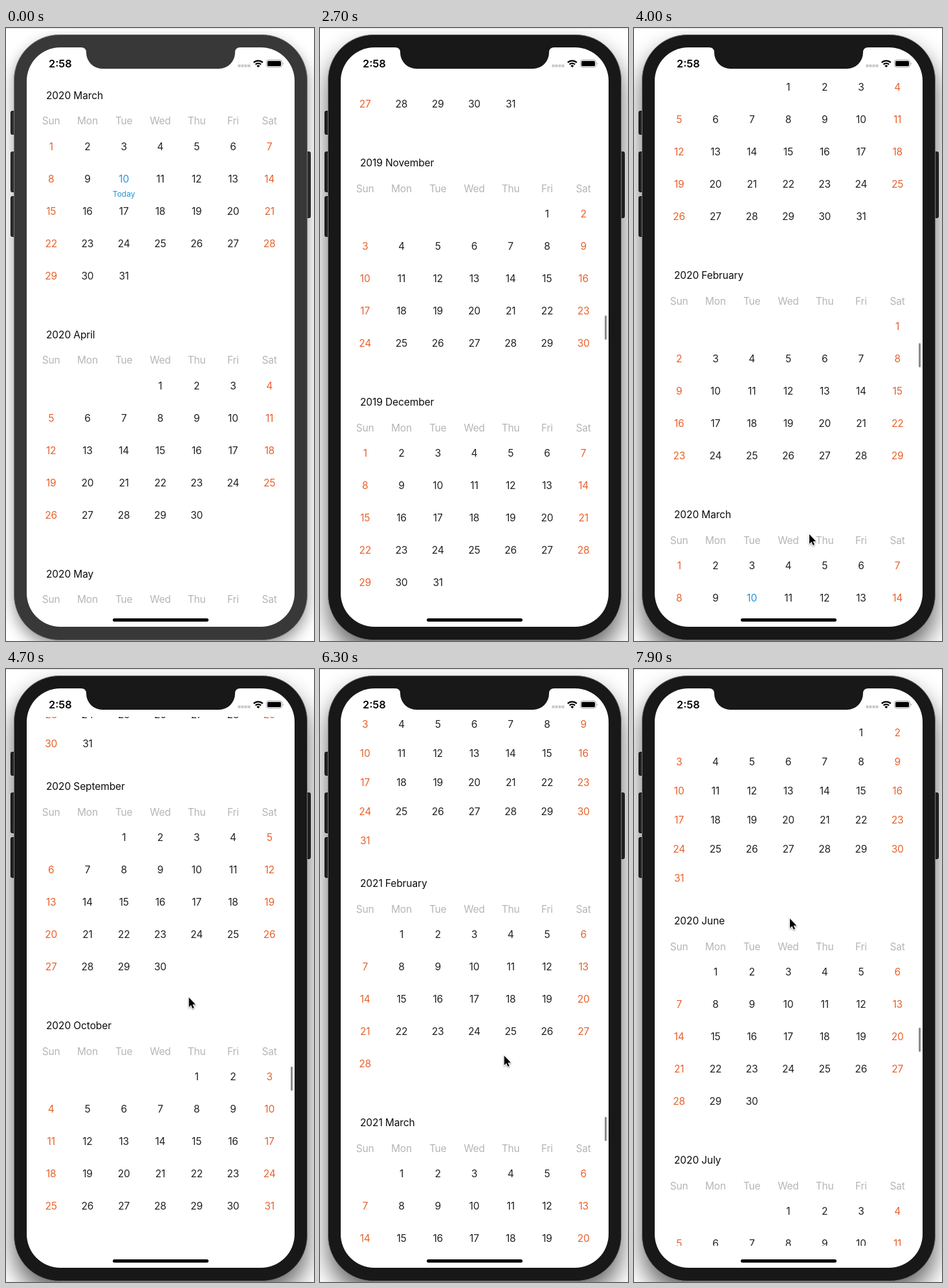
Write an HTML page that moves like this. It is 476x948 px and loops after 8000 ms.

```html
<!DOCTYPE html>
<html lang="en">
<head>
<meta charset="utf-8">
<title>Calendar scroll</title>
<style>
html, body { margin: 0; width: 100%; height: 100%; overflow: hidden; background: #fff; }
svg { display: block; width: 476px; height: 948px; --bezel: #383838; }
svg.active { --bezel: #181818; }
text { font: 15.5px Inter, Roboto, sans-serif; letter-spacing: -.2px; fill: #222; }
.mid { text-anchor: middle; }
.title { fill: #0c0c0c; letter-spacing: -.1px; }
.name { fill: #b5b5b5; }
.off { fill: #e8622c; }
.now { fill: #2095dd; }
.note { font-size: 12px; letter-spacing: 0; }
.clock { font-size: 16.3px; font-weight: 600; fill: #000; letter-spacing: 0; }
.bezel { fill: var(--bezel); }
.key { fill: #2c2c2c; stroke: #161616; }
.active .key { fill: #222; stroke: #0c0c0c; }
.far, .active .near { display: none; }
.active .far { display: inline; }
#cursor { filter: drop-shadow(0 1px 1px #0006); }
</style>
</head>
<body>
<svg id="stage" viewBox="0 0 476 948">
  <defs>
    <filter id="soft" x="-20%" y="-20%" width="140%" height="140%"><feGaussianBlur stdDeviation="11"/></filter>
    <filter id="wide" x="-20%" y="-20%" width="140%" height="140%"><feGaussianBlur stdDeviation="18"/></filter>
    <clipPath id="view"><rect x="32" y="74" width="414" height="818"/></clipPath>
  </defs>
  <rect width="476" height="948" fill="#fff"/>
  <rect class="near" x="12" y="20" width="454" height="937" rx="70" opacity=".4" filter="url(#soft)"/>
  <rect class="far" x="12" y="30" width="454" height="937" rx="70" opacity=".6" filter="url(#wide)"/>
  <rect width="476" height="1" fill="#dcdcdc"/>
  <g class="key">
    <rect x="7.5" y="128.5" width="9" height="36" rx="2"/>
    <rect x="7.5" y="191.5" width="9" height="62" rx="2"/>
    <rect x="7.5" y="260.5" width="9" height="62" rx="2"/>
    <rect x="461.5" y="191.5" width="9" height="102" rx="2"/>
  </g>
  <rect class="bezel" x="12.5" y="10.5" width="453" height="936" rx="70" stroke="#777"/>
  <rect x="32" y="30" width="414" height="896" rx="52" fill="#fff"/>
  <path class="bezel" d="M116 29V30Q124 30 124 38A25 25 0 0 0 149 63H329A25 25 0 0 0 354 38Q354 30 362 30V29Z"/>

  <g clip-path="url(#view)"><g id="list"></g></g>
  <rect id="thumb" x="440" width="3" height="37.5" rx="1.5" fill="#8c8c8c"/>

  <text class="clock" x="66" y="61">2:58</text>
  <path d="M358.5 58.5h19" stroke="#c6c6c6" stroke-width="4" stroke-dasharray="4 1"/>
  <g fill="none" stroke="#000" stroke-width="2.2">
    <path d="M382.8 53.4A10 10 0 0 1 396.8 53.4"/>
    <path d="M385.6 56.4A6 6 0 0 1 394 56.4"/>
  </g>
  <path d="M389.8 61L387.3 58.5A3.6 3.6 0 0 1 392.3 58.5Z"/>
  <rect x="402.5" y="49.5" width="24" height="11" rx="3" fill="none" stroke="#9c9c9c"/>
  <rect x="404" y="51" width="21" height="8" rx="1.6"/>
  <path d="M428 53.2Q430 55 428 56.8Z" fill="#9c9c9c"/>
  <rect x="165" y="913" width="148" height="5" rx="2.5"/>
  <path id="cursor" d="M0 0V13.6L3.1 10.7 5.2 15.6 7.3 14.7 5.2 9.9H9.4Z" stroke="#fff" stroke-width="1.6" paint-order="stroke"/>
</svg>
<script>
const LOOP = 8000, STEP = 100, PAGE = 370;
const $ = id => document.getElementById(id);
const stage = $('stage'), list = $('list'), thumb = $('thumb'), cursor = $('cursor');
const DAYS = ['Sun', 'Mon', 'Tue', 'Wed', 'Thu', 'Fri', 'Sat'];
const MONTHS = ['January', 'February', 'March', 'April', 'May', 'June', 'July',
  'August', 'September', 'October', 'November', 'December'];

const label = (x, y, kind, text) => `<text x="${x}" y="${y}" class="${kind}">${text}</text>`;
const colX = col => 69.7 + 56.24 * col;

// One calendar page; n counts months from March 2020.
function month(n) {
  const first = new Date(2020, 2 + n, 1);
  const year = first.getFullYear(), m = first.getMonth(), lead = first.getDay();
  const count = new Date(year, m + 1, 0).getDate();
  const gap = lead + count > 35 ? 45 : 50;
  const top = 104 + PAGE * n;
  let out = label(62, top + 5.5, 'title', year + ' ' + MONTHS[m]);
  DAYS.forEach((d, i) => out += label(colX(i), top + 45, 'mid name', d));
  for (let d = 1; d <= count; d++) {
    const cell = lead + d - 1, col = cell % 7;
    const y = top + 84.6 + gap * Math.floor(cell / 7);
    const today = n === 0 && d === 10;
    const tone = today ? 'now' : col % 6 ? '' : 'off';
    out += label(colX(col), y, 'mid ' + tone, d);
    if (today) out += label(colX(col), y + 22, 'mid now note', 'Today');
  }
  return out;
}

let pages = '';
for (let n = -8; n < 16; n++) pages += month(n);
list.innerHTML = pages;

// Smooth monotone curve through [time, value] points, at rest at both ends.
function curve(points) {
  const last = points.length - 1;
  const slope = i => (points[i + 1][1] - points[i][1]) / (points[i + 1][0] - points[i][0]);
  const tangent = i => {
    if (i === 0 || i === last) return 0;
    const a = slope(i - 1), b = slope(i);
    return a * b > 0 ? 2 * a * b / (a + b) : 0;
  };
  return t => {
    if (t <= points[0][0]) return points[0][1];
    if (t >= points[last][0]) return points[last][1];
    const i = points.findIndex(p => p[0] > t) - 1;
    const [t0, a] = points[i], [t1, b] = points[i + 1];
    const span = t1 - t0, u = (t - t0) / span, v = 1 - u;
    return a * v * v * (1 + 2 * u) + b * u * u * (3 - 2 * u)
      + span * u * v * (tangent(i) * v - tangent(i + 1) * u);
  };
}

const scroll = curve([[2000, 0], [2700, -1584.5], [3200, -2350], [4000, -648.5],
  [5400, 4109], [5700, 4150], [5800, 4150], [6300, 3842.5], [7900, 824.5]]);
const handX = curve([[800, 446], [1900, 290], [4000, 271], [5300, 292], [5800, 292], [7900, 241]]);
const handY = curve([[800, 738], [1900, 396], [2400, 760], [3400, 330], [3900, 783], [4000, 783],
  [5300, 290], [5800, 290], [6300, 598], [6400, 660], [7900, 386]]);

function draw(t) {
  const y = scroll(t);
  const away = t < 800 || (t > 2500 && t < 3100);
  stage.classList.toggle('active', t >= 2000);
  list.setAttribute('transform', `translate(0 ${-y})`);
  thumb.setAttribute('y', 516.9 + y * 0.04567);
  thumb.style.opacity = t > 2000 ? 1 : 0;
  cursor.setAttribute('transform', `translate(${handX(t)} ${handY(t)}) scale(1.08)`);
  cursor.style.display = away ? 'none' : '';
}

const start = performance.now();
function tick() {
  const t = (performance.now() - start + 4) % LOOP;
  draw(Math.floor(t / STEP) * STEP);
  requestAnimationFrame(tick);
}
tick();
</script>
</body>
</html>
```
